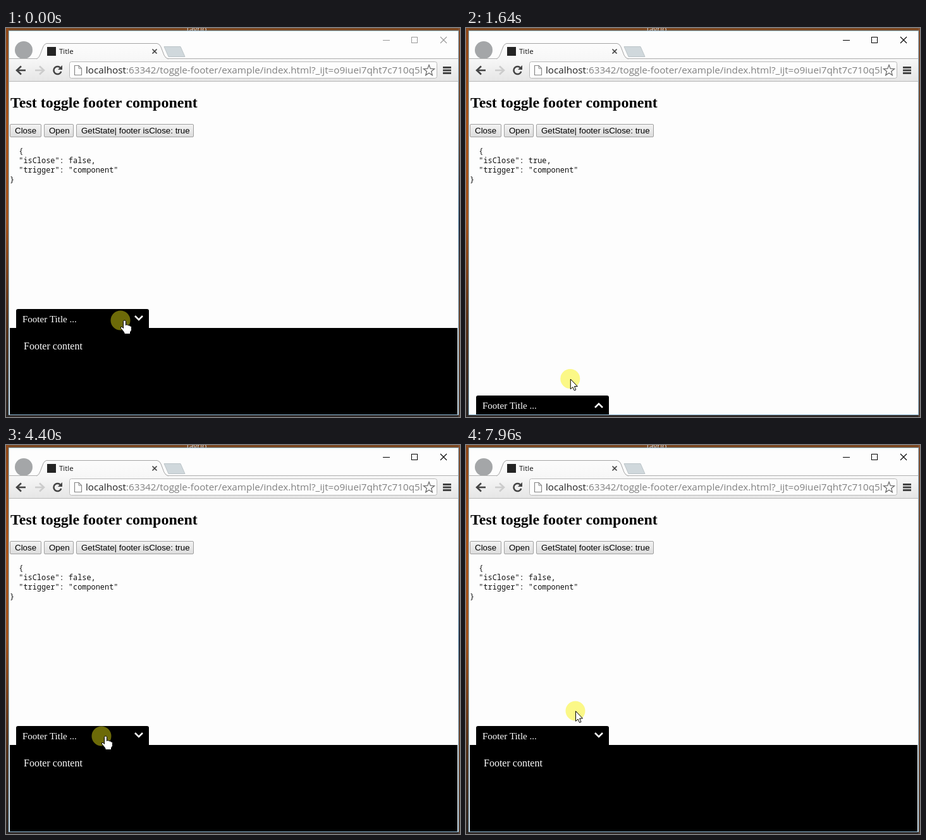
Animation, 718 px wide and 616 px high, one loop 8 s. Source, as an HTML page with a canvas:

```html
<!DOCTYPE html>
<html lang="en">
<head>
<meta charset="utf-8">
<title>Toggle footer</title>
<style>
  html, body { margin: 0; width: 100%; height: 100%; overflow: hidden; }
  canvas { display: block; }
</style>
</head>
<body>
<canvas id="stage" width="718" height="616"></canvas>
<script>
const ctx = document.getElementById('stage').getContext('2d');
const LOOP = 8000, STEP = 40;
const OPEN_TOP = 445, CLOSED_TOP = 582;
const CLOSE_AT = 120, OPEN_AT = 2183, SLIDE = 500;
const PAGE = '#fdfdfd', INK = '#111', DARK = '#444', FOOTER_TEXT = '#fff';
const SANS = '"Liberation Sans", Arial, sans-serif';
const SERIF = '"Liberation Serif", Times, serif';
const MONO = '"Noto Sans Mono", monospace';
const UI = '"Open Sans", sans-serif';

// Pointer stops: time, x, y
const pointerStops = [
  [0, 181, 463], [500, 181, 463], [700, 182, 466], [1200, 182, 466],
  [1900, 157, 596], [3000, 157, 596], [3700, 151, 461], [5800, 151, 461],
  [6000, 151, 459], [7200, 151, 459], [7800, 173, 421], [8000, 173, 421]
];
const handSpans = [[0, 560], [1850, 2700], [3600, 7400]];
const clicks = [80, 2140];

const clamp = v => Math.max(0, Math.min(1, v));
const smooth = v => { const p = clamp(v); return p * p * (3 - 2 * p); };
const mix = (a, b, p) => a + (b - a) * p;

function rect(x, y, w, h, fill) {
  ctx.fillStyle = fill;
  ctx.fillRect(x, y, w, h);
}

function fillPath(color) {
  ctx.fillStyle = color;
  ctx.fill();
}

function outline(color, width) {
  ctx.strokeStyle = color;
  ctx.lineWidth = width;
  ctx.stroke();
}

function roundBox(x, y, w, h, radius, fill, stroke) {
  ctx.beginPath();
  ctx.roundRect(x, y, w, h, radius);
  fillPath(fill);
  if (stroke) outline(stroke, 1);
}

function path(points, closed) {
  ctx.beginPath();
  for (const [x, y] of points) ctx.lineTo(x, y);
  if (closed) ctx.closePath();
}

function line(points, color, width) {
  path(points);
  outline(color, width);
}

function cross(x, y, r, color, width) {
  line([[x - r, y - r], [x + r, y + r]], color, width);
  line([[x + r, y - r], [x - r, y + r]], color, width);
}

function circle(x, y, r) {
  ctx.beginPath();
  ctx.arc(x, y, r, 0, 7);
}

function text(str, x, y, font, color) {
  ctx.font = font;
  ctx.fillStyle = color;
  ctx.fillText(str, x, y);
}

function vertical(y1, y2, ...colors) {
  const g = ctx.createLinearGradient(0, y1, 0, y2);
  colors.forEach((c, i) => g.addColorStop(i / (colors.length - 1), c));
  return g;
}

function drawDesktop() {
  rect(0, 0, 718, 616, vertical(0, 616, '#7c4a24', '#302a28'));
  rect(0, 0, 5, 616, vertical(0, 616, '#8c4a1c', '#a8561c', '#a0541e', '#58351c', '#2c2826'));
  rect(715, 0, 3, 616, vertical(0, 616, '#845030', '#6c4a34', '#283040', '#6c4830', '#4c3c34'));
  text('Tavrio', 284, 6, '12px ' + UI, '#ddd');
  rect(4, 4, 712, 609, '#90bcd8');
  rect(5, 5, 710, 607, PAGE);
}

function drawTabStrip(focused) {
  circle(28, 35, 14);
  fillPath('#a4a6a8');
  path([[250, 29.5], [276, 29.5], [283, 45.5], [257, 45.5]], true);
  fillPath('#d0d8dc');
  outline('#bcc4c8', 1);

  rect(5, 49, 710, 35, vertical(49, 84, '#f7f7f7', '#e6e6e6'));
  line([[5, 48.5], [715, 48.5]], '#b0b0b0', 1);
  ctx.beginPath();
  ctx.moveTo(48, 49);
  ctx.quadraticCurveTo(52, 48, 54, 42);
  ctx.lineTo(59, 29);
  ctx.quadraticCurveTo(61, 25, 64, 24.5);
  ctx.lineTo(239, 24.5);
  ctx.quadraticCurveTo(243, 25, 245, 30);
  ctx.lineTo(250, 43);
  ctx.quadraticCurveTo(252, 48, 257, 49);
  fillPath(vertical(25, 49, '#fcfcfc', '#f7f7f7'));
  outline('#a4a4a4', 1);
  rect(65, 30, 14, 14, '#242424');
  text('Title', 84, 41, '11.5px ' + UI, INK);
  cross(235, 37, 3.5, DARK, 1.7);

  const color = focused ? '#000' : '#999';
  line([[596, 19.5], [607, 19.5]], color, 1);
  ctx.strokeRect(641.5, 14.5, 9, 9);
  cross(692, 19, 5, color, 1.1);
}

function drawArrow(x, direction, color) {
  line([[x - 7 * direction, 67], [x + 6 * direction, 67]], color, 2.6);
  line([[x, 60.5], [x + 7 * direction, 67], [x, 73.5]], color, 2.6);
}

function drawToolbar() {
  drawArrow(24, -1, DARK);
  drawArrow(53, 1, '#ccc');
  ctx.beginPath();
  ctx.arc(81.5, 67, 6, 0.3, 5.5);
  outline(DARK, 2.5);
  path([[89, 59], [89, 66], [82, 66]], true);
  fillPath(DARK);

  roundBox(100.5, 53.5, 581, 26, 3, PAGE, '#b8b8b8');
  path([[108.5, 59.5], [115, 59.5], [119.5, 64], [119.5, 74.5], [108.5, 74.5]], true);
  outline('#888', 1.2);
  line([[115, 59.5], [115, 64], [119.5, 64]], '#888', 1);

  ctx.save();
  ctx.beginPath();
  ctx.rect(120, 54, 541, 25);
  ctx.clip();
  const font = '15.25px ' + UI, host = 'localhost';
  text(host, 126, 72, font, '#222');
  text(':63342/toggle-footer/example/index.html?_ijt=o9iuei7qht7c710q5l',
    126 + ctx.measureText(host).width, 72, font, '#808080');
  ctx.restore();

  const star = Array.from({ length: 10 }, (_, i) => {
    const r = i % 2 ? 3.8 : 9, a = -Math.PI / 2 + i * Math.PI / 5;
    return [669 + r * Math.cos(a), 67.5 + r * Math.sin(a)];
  });
  path(star, true);
  fillPath(PAGE);
  outline('#666', 1.2);
  for (const y of [61, 65.5, 70]) rect(691, y, 13, 3, DARK);
  line([[5, 84.5], [715, 84.5]], '#b8b8b8', 1);
}

function drawButton(label, x, width) {
  roundBox(x + 0.5, 152.5, width - 1, 20, 1.5, vertical(152, 173, '#f4f4f4', '#dcdcdc'), '#a0a0a0');
  text(label, x + 8, 167, '13.33px ' + SANS, '#000');
}

function drawPage(closed) {
  text('Test toggle footer component', 7, 126, 'bold 24px ' + SERIF, '#000');
  drawButton('Close', 6, 50);
  drawButton('Open', 60, 47);
  drawButton('GetState| footer isClose: true', 111, 186);
  const json = ['  {', `  "isClose": ${closed},`, '  "trigger": "component"', '}'];
  json.forEach((row, i) => text(row, 6, 199 + i * 15, '11.92px ' + MONO, INK));
}

function drawFooter(top, closed) {
  ctx.save();
  ctx.beginPath();
  ctx.rect(5, 84, 710, 528);
  ctx.clip();
  roundBox(16, top, 210, 31, [3, 3, 0, 0], '#000');
  rect(6, top + 30, 708, 140, '#000');
  text('Footer Title ...', 26, top + 21, '15px ' + SERIF, FOOTER_TEXT);
  text('Footer content', 28, top + 64, '16px ' + SERIF, FOOTER_TEXT);
  const [ends, middle] = closed ? [19, 13] : [11, 17];
  line([[204, top + ends], [210, top + middle], [216, top + ends]], FOOTER_TEXT, 2.5);
  ctx.restore();
}

function pointerAt(t) {
  const i = pointerStops.findIndex(stop => stop[0] > t);
  const [t1, x1, y1] = pointerStops[i - 1], [t2, x2, y2] = pointerStops[i];
  const p = smooth((t - t1) / (t2 - t1));
  return [mix(x1, x2, p), mix(y1, y2, p)];
}

function drawPointer(t) {
  const [x, y] = pointerAt(t);
  // Pale yellow on white, olive on black
  circle(x, y, 15.5);
  ctx.globalCompositeOperation = 'multiply';
  fillPath('#fdfa88');
  ctx.globalCompositeOperation = 'lighten';
  fillPath('#6c6a08');
  ctx.globalCompositeOperation = 'source-over';

  for (const start of clicks) {
    const p = (t - start) / 340;
    if (p < 0 || p > 1) continue;
    for (const r of [6, 13]) {
      circle(x, y, r * p);
      outline('#a0a020', 1.3);
    }
  }

  ctx.save();
  if (handSpans.some(([from, to]) => t >= from && t < to)) {
    ctx.translate(x - 1.5, y - 0.5);
    path([[6, 2], [7, 0.5], [9, 0.5], [10, 2], [10, 8], [12, 7], [13.5, 8.5], [15.5, 8],
      [16.5, 9.5], [18, 9.5], [19, 11], [19, 16], [17, 19], [17, 22], [8, 22], [7, 19],
      [2, 13], [2, 11], [4, 11], [6, 13]], true);
  } else {
    ctx.translate(x, y);
    path([[0.5, 0.5], [0.5, 16.5], [4, 13], [6.5, 18.5], [9, 17.5], [6.7, 12], [11.5, 12]], true);
  }
  fillPath('#fff');
  outline('#000', 1);
  ctx.restore();
}

function render(t) {
  const closed = t >= CLOSE_AT && t < OPEN_AT;
  const shut = smooth((t - CLOSE_AT) / SLIDE) - smooth((t - OPEN_AT) / SLIDE);
  drawDesktop();
  drawTabStrip(t >= 80);
  drawToolbar();
  drawPage(closed);
  drawFooter(Math.round(mix(OPEN_TOP, CLOSED_TOP, shut)), closed);
  drawPointer(t);
}

const startTime = performance.now();
function tick() {
  const elapsed = (performance.now() - startTime) % LOOP;
  render(Math.floor(elapsed / STEP) * STEP);
  requestAnimationFrame(tick);
}
tick();
</script>
</body>
</html>
```
